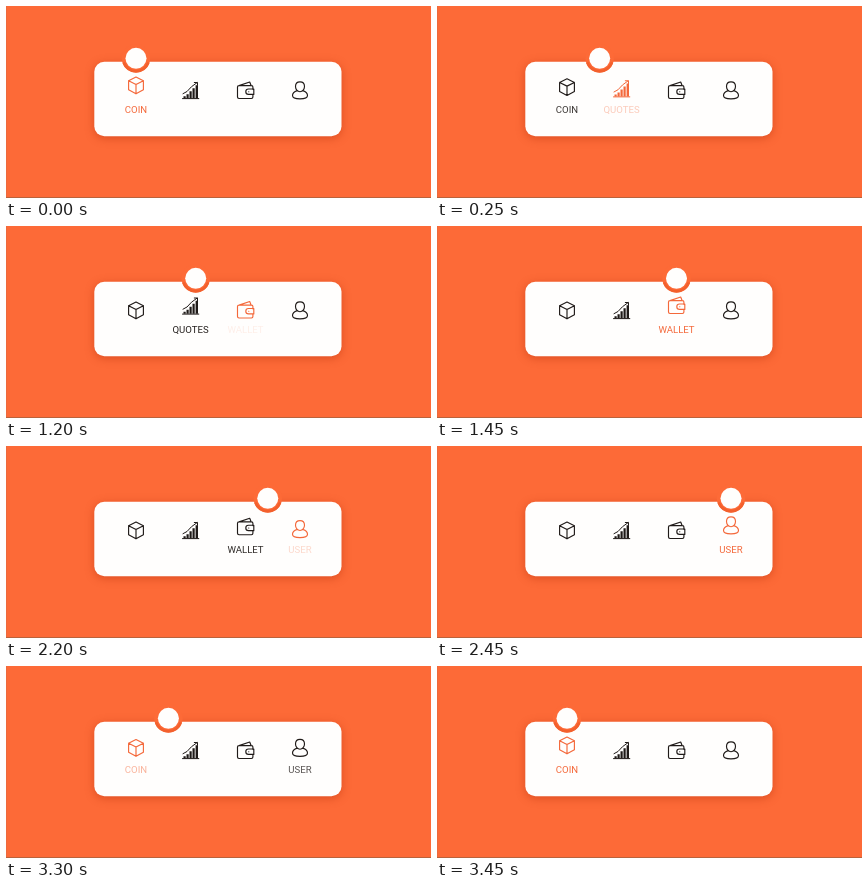
An HTML page that plays this animation: 425 px wide and 192 px high, repeating every 3950 ms.

```html
<!DOCTYPE html>
<html lang="en">
<head>
<meta charset="utf-8">
<title>Tab bar</title>
<style>
  html, body { margin: 0; width: 100%; height: 100%; overflow: hidden; background: #fd6a37; }
  svg { display: block; width: 100%; height: 100%; }
  .card { fill: #fffefd; filter: drop-shadow(0 2px 5px rgba(165, 35, 0, .38)); }
  .tab { color: #1f1a18; }
  .tab.on { color: #f4683a; }
  .icon { fill: none; stroke: currentColor; stroke-width: 1.15; stroke-linejoin: round; stroke-linecap: round; }
  .solid { fill: currentColor; stroke: none; }
  text { font: 9.6px Roboto, Arial, sans-serif; fill: currentColor; text-anchor: middle; }
</style>
</head>
<body>
<svg viewBox="0 0 425 192">
  <rect width="425" height="192" fill="#fd6a37"/>
  <path d="M.5 0V192" stroke="#ec6a3d"/>
  <path d="M0 191.5H425" stroke="#b9623c"/>
  <rect class="card" x="88.3" y="55.7" width="247.2" height="74.5" rx="10"/>

  <g class="tab">
    <path class="icon" d="M0-8.3 7.4-4.6V4.5L0 8.5-7.4 4.5V-4.6ZM-7.4-4.6 0-.9 7.4-4.6M0-.9V8.5"/>
    <text y="107.3">COIN</text>
  </g>
  <g class="tab">
    <g class="icon">
      <path class="solid" d="M-7 8V6h2.2V8ZM-4 8V4h2.2V8ZM-1 8V1h2.2V8ZM2-2h2.2V8H2ZM5.1-5h2.4V8H5.1Z"/>
      <path d="M-8 8.3H8.3M-7.5 3.4-3.5 1.2 1-3.6 6.6-7.7M3.8-7.8H7V-5" stroke-width="1"/>
    </g>
    <text y="107.3">QUOTES</text>
  </g>
  <g class="tab">
    <path class="icon" d="M-6.5-4.7H6Q7.4-4.7 7.4-3.3V-1M7.4 4V6.8Q7.4 8.2 6 8.2H-6.5Q-8 8.2-8 6.8V-3.3Q-8-4.7-6.5-4.7L4.2-8.3 5.6-4.8M8.3-1.3V4.1H3A2.7 2.7 0 0 1 3-1.3ZM3.2 1.4h.1"/>
    <text y="107.3">WALLET</text>
  </g>
  <g class="tab">
    <path class="icon" d="M0-8.5C3-8.5 4.5-6.4 4.5-3.8S2.5 1.4 0 1.4-4.5-1.2-4.5-3.8-3-8.5 0-8.5ZM-2.8.3C-6 1.4-7.5 3-7.5 5.2S-4 8.5 0 8.5 7.5 7.4 7.5 5.2 6 1.4 2.8.3"/>
    <text y="107.3">USER</text>
  </g>

  <g id="knob">
    <circle r="14.2" fill="#fd6a37"/>
    <path d="M-12.4 4A13 13 0 0 0 12.4 4" fill="none" stroke="#f3602d" stroke-width="2.6"/>
    <circle r="10.5" fill="#fffefd"/>
  </g>
</svg>
<script>
  const LOOP = 3950, STEP = 50;
  const centers = [130, 184.5, 239.5, 294];
  // start, end, and how far the move has already come on its first step
  const moves = [
    { start: 150, end: 450, lead: .02 },
    { start: 1200, end: 1450, lead: .1 },
    { start: 2200, end: 2450, lead: .25 },
    { start: 3150, end: 3450, lead: 0 }
  ];
  const tabs = [...document.querySelectorAll('.tab')];
  const knob = document.getElementById('knob');
  const mix = (a, b, p) => a + (b - a) * p;

  // cubic-bezier(.25, .1, .25, 1)
  function ease(x) {
    const curve = (a, b, u) => 3 * a * u * (1 - u) ** 2 + 3 * b * u * u * (1 - u) + u ** 3;
    let low = 0, high = 1;
    for (let i = 0; i < 20; i++) {
      const mid = (low + high) / 2;
      if (curve(.25, .25, mid) < x) low = mid; else high = mid;
    }
    return curve(.1, 1, low);
  }

  function render(time) {
    const index = moves.findLastIndex(move => time >= move.start);
    const from = Math.max(index, 0);
    const to = (index + 1) % 4;
    let x = 1;
    if (index >= 0) {
      const { start, end, lead } = moves[index];
      x = mix(lead, 1, Math.min((time - start) / (end - start), 1));
    }
    tabs.forEach((tab, i) => {
      const shown = i === to ? x : i === from ? 1 - x : 0;
      const opacity = i === to ? x : i === from ? 1 - x * x : 0;
      tab.classList.toggle('on', i === to);
      tab.setAttribute('transform', `translate(${centers[i]} 0)`);
      tab.firstElementChild.setAttribute('transform', `translate(0 ${mix(84.3, 79.3, shown)})`);
      tab.lastElementChild.setAttribute('opacity', opacity);
    });
    knob.setAttribute('transform', `translate(${mix(centers[from], centers[to], ease(x))} 52.3)`);
  }

  const origin = performance.now();
  function tick() {
    const time = (performance.now() - origin) % LOOP;
    render(Math.floor(time / STEP) * STEP);
    requestAnimationFrame(tick);
  }
  tick();
</script>
</body>
</html>
```
